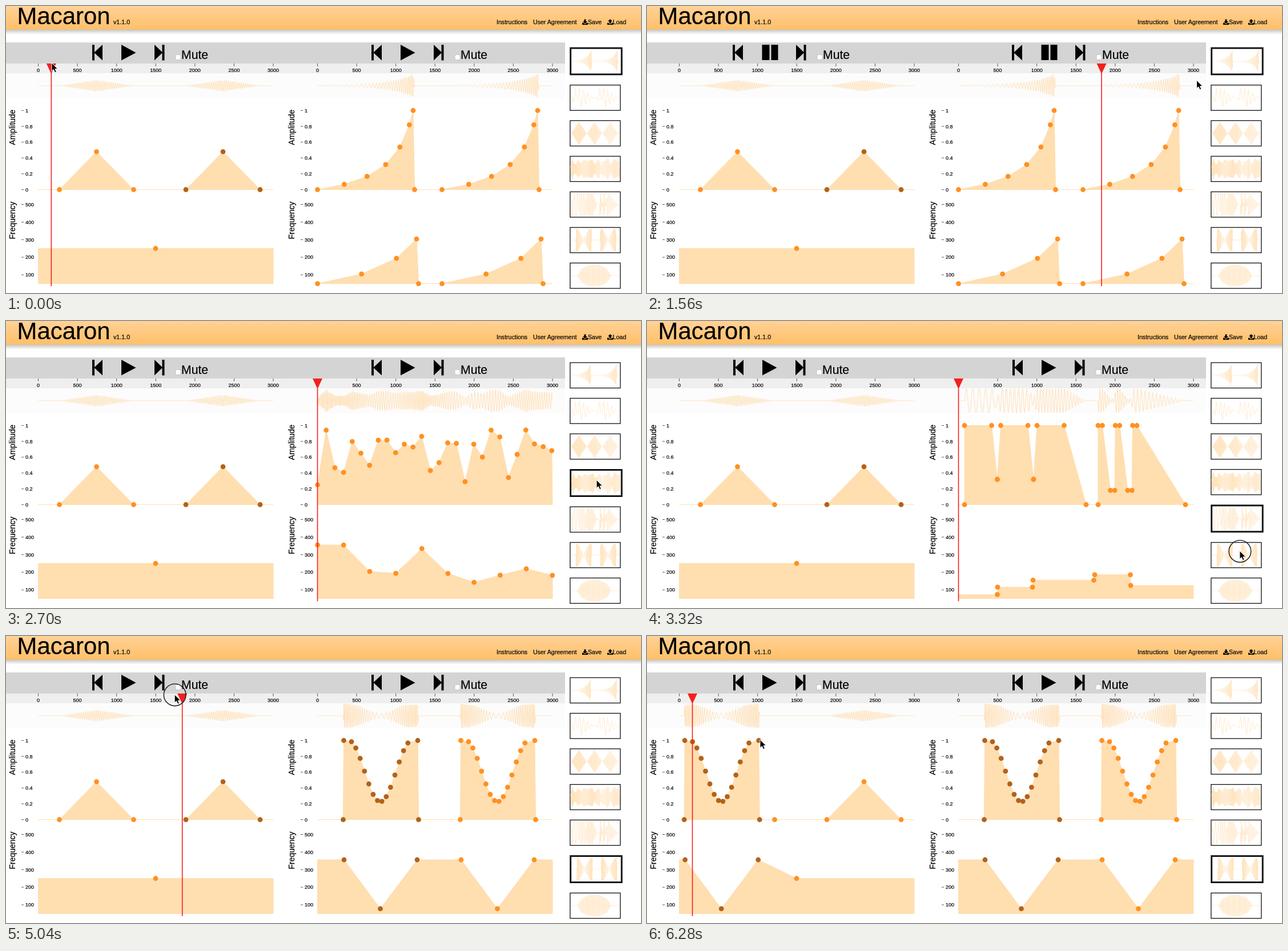
Recreate the animation shown at these times as an HTML page. Size 1112x504 px, loop 6300 ms.

```html
<!DOCTYPE html>
<html lang="en">
<head>
<meta charset="utf-8">
<title>Macaron</title>
<style>
html, body { margin: 0; width: 100%; height: 100%; overflow: hidden; background: #fff; }
svg { display: block; width: 1112px; height: 504px; font-family: "Liberation Sans", Arial, sans-serif; }
text { stroke: #000; stroke-width: .2px; }
.tick { font-size: 9px; }
.axis { font-size: 14px; text-anchor: middle; }
.menu { font-size: 10.6px; }
.area { fill: #ffdeb0; stroke: #ffdeb0; }
.wave { fill: none; stroke: #ffdbaa; }
</style>
</head>
<body>
<svg viewBox="0 0 1112 504">
  <defs>
    <linearGradient id="bar" x2="0" y2="1">
      <stop stop-color="#ffd296"/><stop offset="1" stop-color="#ffbf69"/>
    </linearGradient>
    <linearGradient id="shade" x2="0" y2="1">
      <stop stop-color="#000" stop-opacity=".24"/><stop offset="1" stop-color="#000" stop-opacity="0"/>
    </linearGradient>
  </defs>
  <rect y="41" width="1112" height="9" fill="url(#shade)"/>
  <rect width="1112" height="41.5" fill="url(#bar)"/>
  <text x="19.5" y="32" font-size="41.9">Macaron</text>
  <text x="188" y="32" font-size="10.7">v1.1.0</text>
  <g class="menu">
    <text x="859" y="32">Instructions</text>
    <text x="923" y="32">User Agreement</text>
    <text x="1019" y="32">Save</text>
    <text x="1062.5" y="32">Load</text>
    <path d="M1012.5 23.5h3v3.5h2.5l-4 4-4-4h2.5zM1009 29.5h2l3 2.5 3-2.5h2v3.5h-10z"/>
    <path d="M1056.5 30.5h3v-3.5h2.5l-4-4-4 4h2.5zM1053 29.5h2.5v2h5v-2h2.5v3.5h-10z"/>
  </g>
  <rect y="64" width="979" height="37" fill="#d4d4d4"/>
  <rect y="101" width="979" height="17.5" fill="#efefef"/>
  <rect y="118.5" width="979" height="43.5" fill="#fcfcfc"/>
  <g id="axes"></g>
  <g id="scene"></g>
  <path id="head" d="M-8.5 101h17L.8 117.5V492H-.8V117.5z" fill="#f5201c"/>
  <circle id="press" r="19.3" fill="none" stroke="#111" stroke-width="1.4"/>
  <path id="cursor" d="M0 0V14.5L3.3 11.5 5.7 16.8 8.3 15.7 6 10.6H10.6z" stroke="#fff"/>
</svg>
<script>
const LOOP = 6300, WIDTH = 411.5, LEFT = 56.5, RIGHT = 545.5;
const $ = id => document.getElementById(id);
const range = (n, f) => Array.from({ length: n }, (_, i) => f(i));
const ampY = a => 322.5 - 139 * a;
const freqY = hz => 503 - .309 * hz;

// Envelopes are lists of [x, value]: amplitude 0..1 or frequency in Hz
const shift = (pts, dx) => pts.map(([x, v]) => [x + dx, v]);
const twice = (pts, dx) => [...pts, ...shift(pts, dx)];
const tent = (x, half, peak) => [[x - half, 0], [x, peak], [x + half, 0]];

const growth = range(7, i => {
  const u = 1 - (1 - i / 6) ** 1.8;
  return [167.5 * u, .23 * u / (1.23 - u)];
});
const sweep = range(4, i => [173.5 * (1 - (1 - i / 3) ** 1.45), 50 + 254 * (i / 3) ** 1.4]);

const pulse = x => [[x, .2], [x + 6, .81], [x + 21, .81]];
const pulses = [[11.5, 0], [12.5, .2], ...pulse(25.5), [48.5, .2], ...pulse(62.5), [92.5, .81], [196.5, 0]];

// Three plateaus with dips between them, then a fade
function burst(start, hold, gap, low, flat, end) {
  const pts = [[start, 0]];
  for (let i = 0; i < 3; i++) {
    const x = start + i * (hold + gap), drop = x + hold + .62 * gap;
    pts.push([x, 1], [x + hold, 1]);
    if (i < 2) pts.push([drop, low], [drop + flat, low]);
  }
  return [...pts, [end, 0]];
}

const valley = [[45, 0], [46, 1],
  ...range(14, i => {
    const x = 59.5 + 7.6 * i;
    return [x, 1 - .773 * Math.cos(Math.min(.0283 * Math.abs(x - 110), Math.PI / 2)) ** 2];
  }), [175.5, 1], [177, 0]];
const dip = [[46.5, 356], [110, 78], [174.5, 356]];

let seed = 7;
const random = () => (seed = seed * 16807 % 2147483647) / 2147483647;

const presets = [
  { amp: twice([...growth, [170, 0]], 218), freq: twice([...sweep, [177, 50]], 218) },
  { amp: twice(pulses, 205), freq: [[0, 57], [205.5, 57]] },
  { amp: range(3, i => tent(71 + 131 * i, 63, 1)).flat(), freq: range(3, i => [71 + 131 * i, 300 - 75 * i]) },
  { amp: range(28, i => [15.2 * i, .25 + .75 * random()]), freq: range(10, i => [45.7 * i, 100 + 280 * random()]) },
  { amp: [...burst(10.5, 47.5, 16, .32, 0, 223.5), ...burst(244.5, 7.5, 22.7, .18, 7.5, 397.5)],
    freq: [[68, 73], [68.5, 115], [129.5, 115], [130.5, 155], [237, 155], [238.5, 186], [301, 186], [301.5, 125]] },
  { amp: twice(valley, 205), freq: twice(dip, 205) },
  { amp: range(9, i => [55 + 36 * i, .95 * Math.sqrt(Math.abs(Math.sin(Math.PI * i / 8)))]), freq: [[55, 180], [343, 180]] }
];
const tents = twice(tent(102, 65, .48), 221.5);
const before = { amp: tents, freq: [[205.5, 250]] };
const after = {
  amp: [...shift(valley, -36.3), ...tents.slice(2)],
  freq: [...shift(dip, -36.3), ...before.freq]
};

function valueAt(pts, x) {
  const i = pts.findIndex(p => p[0] >= x);
  if (i < 0) return pts[pts.length - 1][1];
  if (!i) return pts[0][1];
  const [a, b] = [pts[i - 1], pts[i]];
  return a[1] + (b[1] - a[1]) * (x - a[0]) / (b[0] - a[0]);
}

// Envelope times a sine whose phase follows the frequency curve
function wave({ amp, freq }, width, half, slow) {
  const step = .4, seconds = step * 3 / WIDTH, first = amp[0][0], last = amp[amp.length - 1][0];
  let d = '', phase = 0;
  for (let x = 0; x <= WIDTH; x += step) {
    const a = x >= first && x <= last ? valueAt(amp, x) : 0;
    phase += 2 * Math.PI * valueAt(freq, x) / slow * seconds;
    d += (d ? 'L' : 'M') + (x * width / WIDTH).toFixed(2) + ' ' + (-a * half * Math.sin(phase)).toFixed(2);
  }
  return d;
}
for (const s of [...presets, before, after]) {
  s.full = wave(s, WIDTH, 21, 6);
  s.small = wave(s, 86, 20, 14);
}

function curve(data, scale, base, dark, rest) {
  const pts = data.map(([x, v]) => [x, scale(v)]);
  const from = rest ?? pts[0][1], to = rest ?? pts[pts.length - 1][1];
  return `<path class="area" d="M0 ${base}V${from}L${pts.join('L')}L${WIDTH} ${to}V${base}z"/>` +
    pts.map(([x, y]) => `<circle cx="${x}" cy="${y}" r="4.4" fill="${dark(x) ? '#b3621a' : '#ff9022'}"/>`).join('');
}

function panel(x, s, dark, playing) {
  const k = playing ? 1 : 0;
  const play = playing ? 'M145 68h13v27h-13zM161 68h12v27h-12z' : 'M145.5 68l25.5 14-25.5 13.5z';
  return `<g transform="translate(${x})">
    <path d="M${94.5 - k} 68h4v13l14-13v27.5l-14-13v13h-4zM${203.5 + k} 68l13.5 13V68h4v27.5h-4v-13l-13.5 13z${play}"/>
    <rect x="${240.5 + k}" y="85.5" width="9" height="9" rx="2" fill="#fff" stroke="#bbb" stroke-width=".8"/>
    <text x="${250.5 + k}" y="93.3" font-size="21.2">Mute</text>
    <path class="wave" stroke-width=".85" transform="translate(0 140)" d="${s.full}"/>
    ${curve(s.amp, ampY, ampY(0), dark, ampY(0))}${curve(s.freq, freqY, freqY(50), dark)}</g>`;
}

function thumbs(chosen) {
  let y = 72.5;
  return presets.map((s, i) => {
    const b = i === chosen ? 2.9 : 1.3, top = y + b;
    y += 59.9 + 2 * b;
    return `<g transform="translate(${987.2 + b} ${top})">
      <rect x="${-b / 2}" y="${-b / 2}" width="${86.6 + b}" height="${43.2 + b}" fill="#fff" stroke="#111" stroke-width="${b}"/>
      <path class="wave" stroke-width=".6" transform="translate(0 21.6)" d="${s.small}"/></g>`;
  }).join('');
}

function axes(x) {
  const mark = d => `<path d="${d}" stroke="#333" stroke-width=".8"/>`;
  const tick = (y, label) => mark(`M-29.5 ${y}h4`) + `<text class="tick" x="-22.5" y="${y + 3.2}">${label}</text>`;
  const title = (y, label) => `<text class="axis" transform="translate(-40.5 ${y}) rotate(-90)">${label}</text>`;
  const ruler = range(7, i => {
    const px = i * WIDTH / 6;
    return mark(`M${px} 101v5`) + `<text class="tick" x="${px}" y="116" text-anchor="middle">${i * 500}</text>`;
  });
  const scales = [...range(6, i => tick(ampY(i / 5), i / 5)), ...range(5, i => tick(freqY(100 * i + 100), 100 * i + 100))];
  return `<g transform="translate(${x})">${ruler.join('')}${scales.join('')}${title(213, 'Amplitude')}${title(376.5, 'Frequency')}</g>`;
}
$('axes').innerHTML = axes(LEFT) + axes(RIGHT);

const PLAY = 800, DRAG = 3700, DROP = 4500, SEEK = 4900, SET = 5440, PASTE = 5650;
const picks = range(5, i => 1760 + 400 * i);
const presses = [...[PLAY, ...picks].map(t => [t - 40, t + 60]), [DRAG, DROP], [SEEK, SET + 40]];

// Cursor stops: time, x, y
const path = [
  [0, 80, 100], [PLAY - 60, 703, 82], [PLAY + 70, 703, 82], [1140, 752, 72],
  ...picks.flatMap((t, i) => [0, 120].map(wait => [t + wait, 1030 + 2 * i, 149 + 64.5 * i])),
  [DRAG, 573, 200], [4180, 753.5, 515], [DROP, 753.5, 515],
  [SEEK, 339, 103], [SET, 79.5, 101], [PASTE, 79.5, 101], [6180, 198, 182], [LOOP, 198, 182]
];
function cursorAt(t) {
  const i = Math.max(1, path.findIndex(p => p[0] >= t));
  const [a, b] = [path[i - 1], path[i]];
  const u = (t - a[0]) / (b[0] - a[0]), e = u * u * (3 - 2 * u);
  return [a[1] + (b[1] - a[1]) * e, a[2] + (b[2] - a[2]) * e];
}

function headAt(t) {
  if (t < PLAY) return 79.3;
  if (t < picks[0]) return RIGHT + (t - PLAY) * 2.4 * WIDTH / 3000;
  return t < SEEK ? RIGHT : cursorAt(Math.min(t - 26, SET))[0];
}

let shown = '';
function draw(t) {
  const chosen = picks.filter(p => p <= t).length;
  const preset = presets[chosen];
  const playing = t >= PLAY && t < picks[0], pasted = t >= PASTE, brushing = t >= DRAG && t < DROP;
  const [x, y] = cursorAt(t);
  const edge = t < DRAG ? 0 : cursorAt(Math.min(t, DROP))[0];
  const key = [chosen, playing, pasted, edge, brushing].join();
  if (key !== shown) {
    shown = key;
    const leftDark = px => pasted ? px < 141 : px > 250;
    const rightDark = px => px + RIGHT < edge;
    const brush = brushing
      ? `<rect x="573.5" y="172" width="${Math.max(0, edge - 573.5)}" height="320" opacity=".125"/>` : '';
    $('scene').innerHTML = panel(LEFT, pasted ? after : before, leftDark, playing) +
      panel(RIGHT, preset, rightDark, playing) + brush + thumbs(chosen);
  }
  $('head').setAttribute('transform', `translate(${headAt(t)})`);
  $('cursor').setAttribute('transform', `translate(${x} ${y})`);
  $('press').setAttribute('transform', `translate(${x + .5} ${y + .8})`);
  $('press').style.display = presses.some(([a, b]) => t >= a && t < b) ? '' : 'none';
}

const start = performance.now();
function tick() {
  draw((performance.now() - start) % LOOP);
  requestAnimationFrame(tick);
}
tick();
</script>
</body>
</html>
```
